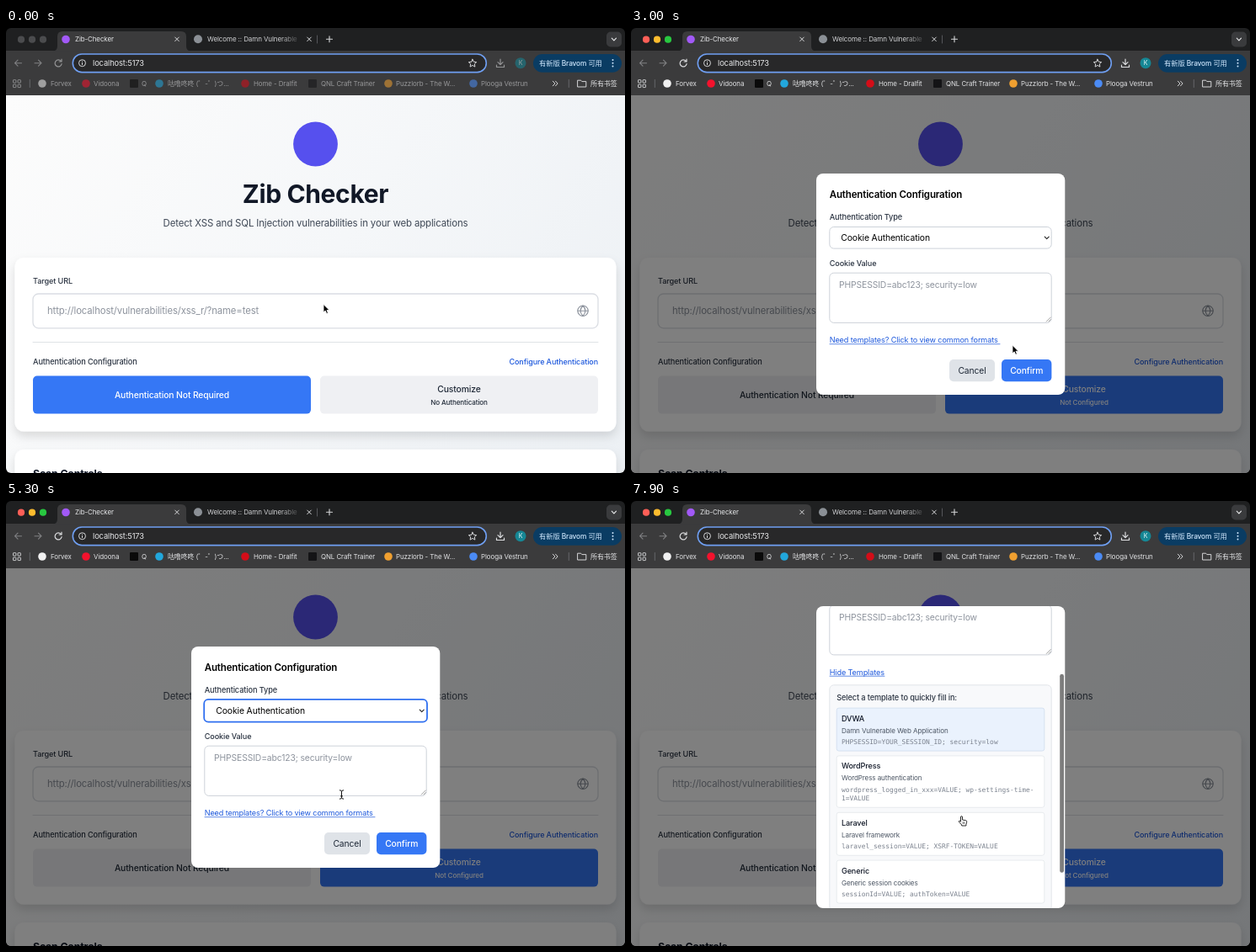
Write an HTML page that moves like this. It is 735 px wide and 529 px high and loops after 8 s.

```html
<!DOCTYPE html>
<html lang="en">
<head>
<meta charset="utf-8">
<title>Authentication setup</title>
<style>
  html, body { margin: 0; width: 100%; height: 100%; overflow: hidden; background: #000; }
  svg { display: block; width: 735px; height: 529px; }
  text { font-family: Inter, "Noto Sans CJK SC", "Noto Sans CJK", sans-serif; letter-spacing: -.012em; white-space: pre; }
  .mono { font-family: "DejaVu Sans Mono", monospace; letter-spacing: 0; }
  .line { fill: none; stroke-linecap: round; stroke-linejoin: round; }
</style>
</head>
<body>
<svg id="stage" viewBox="0 0 735 529" xmlns="http://www.w3.org/2000/svg"></svg>
<script>
const LOOP = 8000;
const FOCUS = 800, OPEN_MODAL = 2000, OPEN_MENU = 3400, CLOSE_MENU = 4600, OPEN_TEMPLATES = 5800;
const BLUE = '#3577f5', DARK = '#1f2937', LABEL = '#2b3442', HINT = '#8d939d';

// Drawing helpers return SVG markup.
const text = (x, y, size, str, fill, weight = 400, more = '') =>
  `<text x="${x}" y="${y}" font-size="${size}" font-weight="${weight}" fill="${fill}" ${more}>${str}</text>`;
const mid = 'text-anchor="middle"';
const rect = (x, y, w, h, r, fill, more = '') =>
  `<rect x="${x}" y="${y}" width="${w}" height="${h}" rx="${r}" fill="${fill}" ${more}/>`;
const dot = (x, y, r, fill, more = '') => `<circle cx="${x}" cy="${y}" r="${r}" fill="${fill}" ${more}/>`;
const line = (d, stroke, width = 1, more = '') =>
  `<path class="line" d="${d}" stroke="${stroke}" stroke-width="${width}" ${more}/>`;
const border = (color, width = 1) => `stroke="${color}" stroke-width="${width}"`;
const close = (x, y) => line(`M${x - 2.3} ${y - 2.3}l4.6 4.6m0-4.6l-4.6 4.6`, '#d5d6d8');

function lights() {
  const colors = ['#ff5f57', '#febc2e', '#28c840'];
  const row = list => list.map((c, i) => dot(18 + 13 * i, 13.7, 4.1, c)).join('');
  return `<g id="lightsOff">${row(Array(3).fill('#4b4c4e'))}</g><g id="lightsOn">${row(colors)}</g>`;
}

function bookmarks() {
  const items = [
    [43, 53, '#f1f1f1', 'Forvex'], [95, 104, '#f4122d', 'Vidoona'], [152, 161, '#0a0a0a', 'Q', 1],
    [182, 192, '#22a7dc', '咕噜咚咚 (゜-゜)つ...'], [284, 294, '#d40d18', 'Home - Dralfit'],
    [364, 374, '#141416', 'QNL Craft Trainer', 1], [454, 463, '#f0a030', 'Puzzlorb - The W...'],
    [555, 564, '#4b8bf5', 'Plooga Vestrun']
  ];
  return items.map(([ix, tx, color, label, square]) =>
    (square ? rect(ix - 5, 61, 10, 10, 1, color) : dot(ix, 66, 4.8, color)) +
    text(tx, 69, 7.95, label, '#e2e3e5')).join('');
}

function browser() {
  let grid = '';
  for (const x of [8.5, 14]) for (const y of [61.7, 67.2]) grid += rect(x, y, 3.4, 3.4, .4, 'none', border('#d5d6d8', .9));
  return rect(0, 0, 735, 29, 0, '#1f2021') +
    rect(0, 27, 735, 53, 0, '#3b3b3c') +
    '<path d="M55 27.5q6 0 6-6V10q0-6 6-6H208q6 0 6 6V21.5q0 6 6 6z" fill="#3b3b3c"/>' +
    lights() +
    dot(71, 13.5, 4.8, '#a259f7') + text(82, 16.3, 7.95, 'Zib-Checker', '#e6e7e9') + close(203, 13.3) +
    dot(228, 13.3, 5, '#8b9096') + text(239, 16.3, 8, 'Welcome :: Damn Vulnerable', 'url(#fade)') + close(360, 13.3) +
    line('M369.5 9v9', '#55565a') + line('M380.5 13.3h7M384 9.8v7', '#d5d6d8', 1.1) +
    rect(713, 4.5, 18, 18, 5, '#3a3b3d') + line('M719.3 12.2l2.6 2.6 2.6-2.6', '#e6e7e9', 1.2) +
    line('M18.5 41.7h-8m3.5-3.5l-3.5 3.5 3.5 3.5M34 41.7h8m-3.5-3.5l3.5 3.5-3.5 3.5', '#808183', 1.1) +
    rect(79.3, 31, 491, 21.6, 10.8, '#282829', border('#6f9ff2', 1.6)) +
    dot(90.5, 41.7, 4, 'none', border('#d5d6d8', 1)) + line('M90.5 41.3v2.3M90.5 39.6v.1', '#d5d6d8') +
    text(103, 45, 9.3, 'localhost:5173', '#e8e9eb') +
    line('M554 37.2l1.4 3 3.3.4-2.4 2.2.6 3.3-2.9-1.7-2.9 1.7.6-3.3-2.4-2.2 3.3-.4z', '#d5d6d8') +
    '<g id="tools">' +
      line('M65.3 39.5a4 4 0 1 0 .8 3M66 37.2v2.8h-2.8', '#dcdddf', 1.2) +
      line('M587 37v6.5m-3-2.8l3 3 3-3M582.5 44v2.5h9V44', '#dcdddf', 1.2) +
      dot(611, 41.7, 6.5, '#168795') + text(611, 44.3, 7, 'K', '#e8f6f7', 400, mid) +
      grid + bookmarks() +
    '</g>' +
    rect(626, 31, 105, 21.8, 10.9, '#0a3c63') +
    text(633, 44.8, 8.3, '有新版 Bravom 可用', '#cde5fb', 500) +
    [38, 41.7, 45.4].map(y => dot(720.5, y, 1, '#cde5fb')).join('') +
    line('M28.3 61.5v9M668.3 61.5v9', '#66676a') +
    line('M649.3 63.2l2.6 2.8-2.6 2.8m3.2-5.6l2.6 2.8-2.6 2.8', '#d5d6d8') +
    line('M679 62.2h3.6l1.2 1.4h5v6.4H679z', '#d5d6d8') +
    text(694, 69, 8, '所有书签', '#e2e3e5');
}

function page() {
  return rect(0, 80, 735, 449, 0, 'url(#page)') +
    dot(367.5, 138, 26.4, '#5650ee') +
    text(367.5, 208, 30, 'Zib Checker', '#111827', 700, mid) +
    text(367.5, 236, 11.43, 'Detect XSS and SQL Injection vulnerabilities in your web applications', '#3f4856', 400, mid) +
    rect(10.5, 273, 714, 206.5, 10.5, '#fff', 'filter="url(#shadow)"') +
    rect(10.5, 501, 714, 100, 10.5, '#fff', 'filter="url(#shadow)"') +
    text(32, 303.7, 9.15, 'Target URL', LABEL, 500) +
    '<g id="inputIdle">' + rect(32, 316, 671, 40.8, 6.5, '#fff', border('#dadde3', 1.3)) + '</g>' +
    '<g id="inputFocus">' + rect(30, 314, 675, 44.8, 8, '#d5e3fd') +
      rect(32.3, 316.3, 670.4, 40.2, 6.5, '#fff', border('#2f6ff0', 1.7)) + '</g>' +
    text(49, 340.3, 11.35, 'http://localhost/vulnerabilities/xss_r/?name=test', HINT) +
    line('M49.3 329.5v13.5', '#111', .9, 'id="caret"') +
    dot(685, 336.2, 6.2, 'none', border(HINT, 1.1)) +
    line('M678.8 336.2h12.4M685 330c-3.8 4-3.8 8.4 0 12.4c3.8-4 3.8-8.4 0-12.4', HINT, 1.1) +
    line('M32 373.5h671', '#dfe2e6') +
    text(32, 399.6, 9.2, 'Authentication Configuration', LABEL, 500) +
    text(703, 399.6, 9, 'Configure Authentication', '#1d58dc', 500, 'text-anchor="end"') +
    rect(32, 413.6, 330, 45, 5, BLUE, 'id="leftBtn"') + rect(373, 413.6, 330, 45, 5, '#eff0f3', 'id="rightBtn"') +
    text(197, 440, 10.35, 'Authentication Not Required', '#fff', 500, mid + ' id="leftText"') +
    text(538, 433.3, 10.35, 'Customize', DARK, 500, mid + ' id="rightText"') +
    text(538, 448.2, 8.05, 'No Authentication', DARK, 500, mid + ' id="rightNote"') +
    text(32, 534, 12.3, 'Scan Controls', '#111827', 700);
}

function template(y, h, name, about, code, fill) {
  return rect(244.2, y, 246.6, h, 2.6, fill, border(fill === '#fff' ? '#e3e6ea' : '#cfdcee', .8)) +
    text(250, y + 15.4, 9.05, name, '#111827', 500) +
    text(250, y + 29.5, 8.05, about, '#4b5563') +
    code.map((row, i) => text(250, y + 42.7 + 10.6 * i, 7.92, row, '#7b828e', 400, 'class="mono"')).join('');
}

function modal() {
  const link = (id, str, width) => `<g id="${id}">` + text(235.7, 374.2, 9.1, str, '#1d58dc') +
    line(`M236 375.7h${width}`, '#1d58dc', .7) + '</g>';
  return '<g id="modal">' + rect(0, 80, 735, 449, 0, '#000', 'fill-opacity=".5"') +
    rect(220, 173, 295.3, 263, 8, '#fff', 'id="panel"') +
    '<g clip-path="url(#panelClip)"><g id="content">' +
      text(235.7, 202, 11.5, 'Authentication Configuration', '#000', 600) +
      text(235.7, 227.6, 9.2, 'Authentication Type', LABEL, 500) +
      rect(235.8, 236.5, 263.4, 25.6, 5, '#fff', border('#cdd2d9')) +
      '<g id="selectRing">' + rect(235.2, 235.9, 264.8, 26.8, 5, '#fff', border('#2f6ff0', 1.8)) + '</g>' +
      text(249.3, 253, 10.38, 'Cookie Authentication', '#000') +
      line('M491.2 248.2l2.5 2.5 2.5-2.5', '#222', 1.1) +
      text(235.7, 282.5, 9.1, 'Cookie Value', LABEL, 500) +
      rect(235.8, 291.2, 263.4, 59.2, 5, '#fff', border('#cdd2d9')) +
      text(247, 309.2, 10.35, 'PHPSESSID=abc123; security=low', HINT) +
      line('M493.3 349l5-5M496 349l2.4-2.4', '#777', .7) +
      link('linkShow', 'Need templates? Click to view common formats', 202) +
      '<g id="buttons">' +
        rect(378, 394, 54, 26.3, 5, '#dfe3e8') + text(405, 411, 10.35, 'Cancel', DARK, 400, mid) +
        rect(440, 394, 59.4, 26.3, 5, BLUE) + text(469.7, 411, 10.35, 'Confirm', '#fff', 500, mid) +
      '</g>' +
      '<g id="templates">' + link('linkHide', 'Hide Templates', 65) +
        rect(235.8, 386.3, 263.4, 268, 5, '#f8f9fb', border('#e2e5e9')) +
        text(244.2, 404.4, 9.2, 'Select a template to quickly fill in:', LABEL, 500) +
        template(413.6, 51, 'DVWA', 'Damn Vulnerable Web Application', ['PHPSESSID=YOUR_SESSION_ID; security=low'], '#eaf2fd') +
        template(470.4, 61.4, 'WordPress', 'WordPress authentication', ['wordpress_logged_in_xxx=VALUE; wp-settings-time-', '1=VALUE'], '#fff') +
        template(537.8, 51, 'Laravel', 'Laravel framework', ['laravel_session=VALUE; XSRF-TOKEN=VALUE'], '#fff') +
        template(594.6, 51, 'Generic', 'Generic session cookies', ['sessionId=VALUE; authToken=VALUE'], '#fff') +
      '</g></g></g>' +
    rect(509.2, 127, 4.8, 236, 2.4, '#7d7d7d', 'id="scrollbar"') +
    '<g id="menu">' + rect(230.5, 238, 264, 41.5, 4.5, '#48494b', border('#2c2d2f', .8) + ' filter="url(#shadow)"') +
      rect(234, 242, 257, 17, 2.5, '#4a93f3') +
      line('M237.2 250.7l2 2.4 3.6-5.2', '#fff', 1.2) +
      text(246, 254.4, 10.3, 'Cookie Authentication', '#fff') +
      text(246, 271.5, 10.3, 'Header Authentication', '#fff') + '</g></g>';
}

const cursors = () =>
  '<g id="arrow"><path d="M0 0V9.6L2.2 7.6 3.7 11 5.4 10.2 4 7H7z" fill="#000" stroke="#fff" stroke-width=".8"/></g>' +
  '<g id="beam">' + ['#fff', '#111'].map((c, i) =>
    line('M-2.2-5.2Q0-5.2 0-3.8V3.8Q0 5.2-2.2 5.2M2.2-5.2Q0-5.2 0-3.8M0 3.8Q0 5.2 2.2 5.2M-1.2 1.8H1.2', c, i ? 1 : 2)).join('') + '</g>' +
  '<g id="hand"><path d="M-1 1Q-1-.4 0-.4T1 1V4L5.2 4.8Q6.4 5 6.2 6.4L5.4 9.5V11H.2V10L-3 6.6Q-3.6 5.4-2.4 5.2L-1 6.2z" fill="#fff" stroke="#111" stroke-width=".9" stroke-linejoin="round"/>' +
  line('M1.6 6.6v2M3.2 6.6v2', '#111', .6) + '</g>';

const defs = `<defs>
  <linearGradient id="page" gradientUnits="userSpaceOnUse" x1="0" y1="80" x2="735" y2="529">
    <stop offset="0" stop-color="#fcfcfc"/><stop offset=".5" stop-color="#f5f7f9"/><stop offset="1" stop-color="#ecf0f4"/></linearGradient>
  <linearGradient id="fade" gradientUnits="userSpaceOnUse" x1="325" y1="0" x2="348" y2="0">
    <stop offset="0" stop-color="#d0d1d3"/><stop offset="1" stop-color="#d0d1d3" stop-opacity=".15"/></linearGradient>
  <filter id="shadow" x="-10%" y="-20%" width="120%" height="150%">
    <feDropShadow dx="0" dy="6" stdDeviation="6" flood-color="#000" flood-opacity=".13"/></filter>
  <clipPath id="panelClip"><rect id="clipBox" x="220" y="173" width="295.3" height="263" rx="8"/></clipPath>
  <clipPath id="window"><rect width="735" height="529" rx="6"/></clipPath>
</defs>`;

document.getElementById('stage').innerHTML =
  defs + `<g clip-path="url(#window)">${browser()}${page()}${modal()}</g>` + cursors();

const el = {};
document.querySelectorAll('#stage [id]').forEach(node => el[node.id] = node);
const set = (id, attrs) => { for (const key in attrs) el[id].setAttribute(key, attrs[key]); };
const show = (id, on) => set(id, { display: on ? 'inline' : 'none' });

const clamp = v => Math.max(0, Math.min(1, v));
const ease = v => v * v * (3 - 2 * v);
const mix = (a, b, k) => `rgb(${a.map((v, i) => Math.round(v + (b[i] - v) * k))})`;

// Pointer hotspot: time, x, y.
const path = [
  [0, 377, 328.5], [1300, 377, 328.5], [1900, 467, 450], [2800, 467, 450], [3300, 427.5, 245], [4600, 427.5, 245],
  [5200, 398.5, 349], [5350, 398.5, 349], [5650, 394, 370], [6200, 393.5, 372], [7300, 392.5, 375], [LOOP, 392.5, 375]
];

function pointer(t) {
  const i = path.findIndex(p => p[0] > t);
  const [a, b] = [path[i - 1], path[i]];
  const k = ease((t - a[0]) / (b[0] - a[0]));
  return [a[1] + (b[1] - a[1]) * k, a[2] + (b[2] - a[2]) * k];
}

function pointerKind(t, y) {
  if (t < FOCUS) return 'arrow';
  if (t < OPEN_MODAL) return y < 357 ? 'beam' : y > 413 ? 'hand' : 'arrow';
  if (t < CLOSE_MENU) return 'arrow';
  return y > 364 ? 'hand' : y > 291 && y < 351 ? 'beam' : 'arrow';
}

function render(t) {
  const active = t >= FOCUS, opened = t >= OPEN_MODAL, expanded = t >= OPEN_TEMPLATES;
  show('lightsOff', !active);
  show('lightsOn', active);
  set('tools', { opacity: active ? 1 : .55 });

  const focused = active && !opened;
  show('inputIdle', !focused);
  show('inputFocus', focused);
  show('caret', focused && (t - FOCUS) % 1000 < 500);

  const k = clamp((t - OPEN_MODAL) / 200);
  const blue = [53, 119, 245], gray = [239, 240, 243], white = [255, 255, 255], dark = [31, 41, 55];
  set('leftBtn', { fill: mix(blue, gray, k) });
  set('rightBtn', { fill: mix(gray, blue, k) });
  set('leftText', { fill: mix(white, dark, clamp(k * 2)) });
  set('rightText', { fill: mix(dark, white, clamp(k * 2)) });
  set('rightNote', { fill: mix(dark, white, clamp(k * 2)) });
  el.rightNote.textContent = opened ? 'Not Configured' : 'No Authentication';

  show('modal', opened);
  show('menu', t >= OPEN_MENU && t < CLOSE_MENU);
  show('selectRing', t >= OPEN_MENU && !expanded);
  show('linkShow', !expanded);
  show('buttons', !expanded);
  show('templates', expanded);

  const scroll = 119.5 * ease(clamp((t - 7350) / 550));
  const box = expanded ? { y: 125, height: 359 } : { y: 173, height: 263 };
  set('panel', box);
  set('clipBox', box);
  set('content', { transform: `translate(0 ${expanded ? -48 - scroll : 0})` });
  show('scrollbar', scroll > 0);
  set('scrollbar', { y: 127 + scroll * .66 });

  const [x, y] = pointer(t), kind = pointerKind(t, y);
  for (const id of ['arrow', 'beam', 'hand']) {
    show(id, id === kind);
    set(id, { transform: `translate(${x} ${y})` });
  }
}

const start = performance.now();
function tick() {
  render((performance.now() - start) % LOOP);
  requestAnimationFrame(tick);
}
tick();
</script>
</body>
</html>
```
